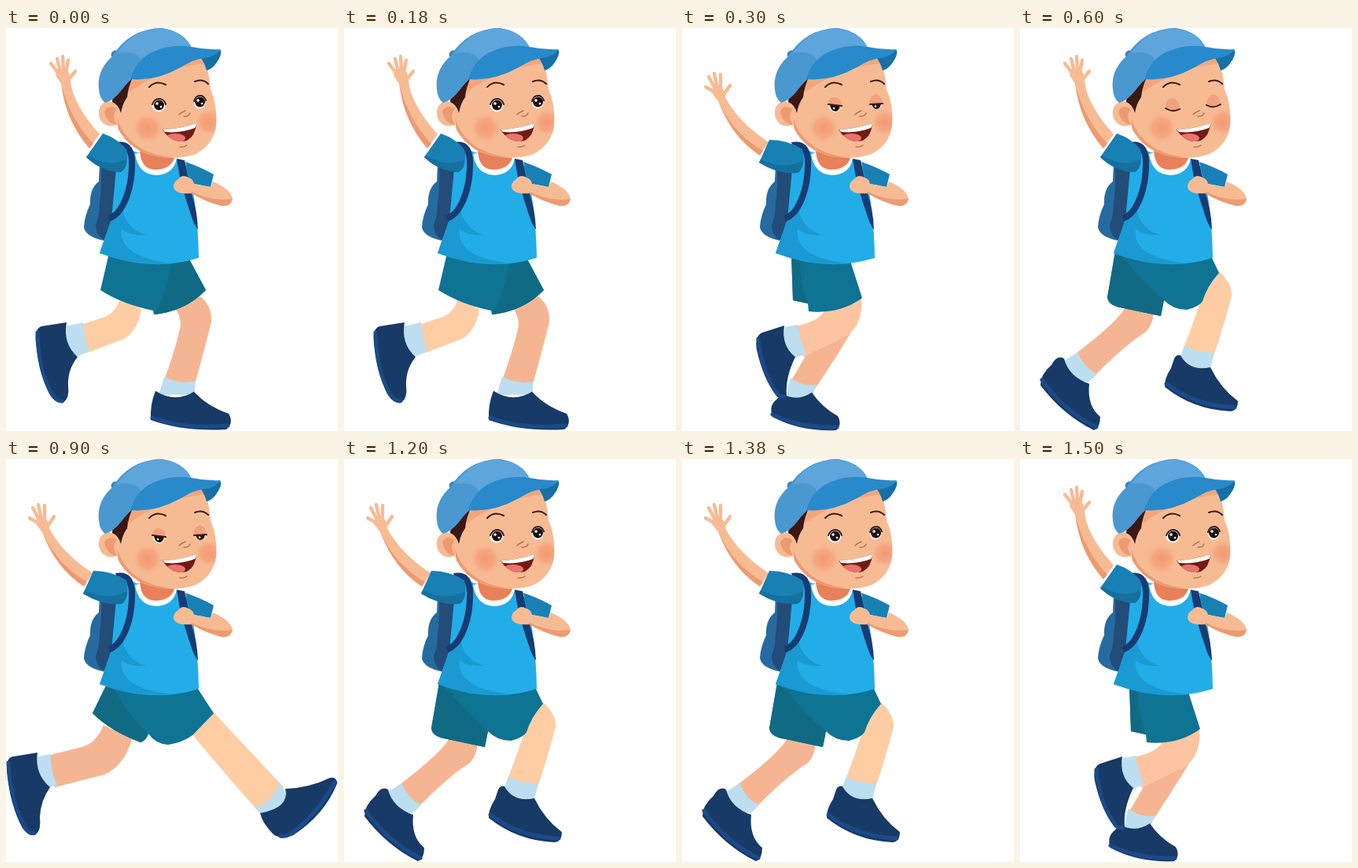
These frames come from a looping animation (422x512 px, 1.8 s). An HTML page:

```html
<!DOCTYPE html>
<html lang="en">
<head>
<meta charset="utf-8">
<title>Walking schoolboy</title>
<style>
html, body { margin: 0; width: 100%; height: 100%; overflow: hidden; background: #fff; }
svg { display: block; width: 100vw; height: 100vh; }

/* Poses switch hard, six beats of 300 ms */
.pose { opacity: 0; animation: 1.8s step-end infinite; }
.arm-up { animation-name: arm-up; }
.arm-out { animation-name: arm-out; }
.eyes-open { animation-name: eyes-open; }
.eyes-half { animation-name: eyes-half; }
.eyes-shut { animation-name: eyes-shut; }
.kick { animation-name: kick; }
.pass { animation-name: pass; }
.step { animation-name: step; }
.leap { animation-name: leap; }
@keyframes arm-up { 0%, 33.33%, 83.33% { opacity: 1 } 16.66%, 50%, 100% { opacity: 0 } }
@keyframes arm-out { 0%, 33.33%, 83.33%, 100% { opacity: 0 } 16.66%, 50% { opacity: 1 } }
@keyframes eyes-open { 0%, 66.66%, 100% { opacity: 1 } 16.66% { opacity: 0 } }
@keyframes eyes-half { 0%, 33.33%, 66.66%, 100% { opacity: 0 } 16.66%, 50% { opacity: 1 } }
@keyframes eyes-shut { 0%, 50%, 100% { opacity: 0 } 33.33% { opacity: 1 } }
@keyframes kick { 0% { opacity: 1 } 16.66%, 100% { opacity: 0 } }
@keyframes pass { 0%, 33.33%, 100% { opacity: 0 } 16.66%, 83.33% { opacity: 1 } }
@keyframes step { 0%, 50%, 83.33%, 100% { opacity: 0 } 33.33%, 66.66% { opacity: 1 } }
@keyframes leap { 0%, 66.66%, 100% { opacity: 0 } 50% { opacity: 1 } }

.skin { fill: #f7bb94; }
.thigh { fill: #fdc4a2; }
.near { fill: #fecda4; }
.far { fill: #f6b592; }
.shade { fill: #ee9a70; }
.neck { fill: #e8805a; }
.sock { fill: #bcdef0; }
.shoe { fill: #183a66; }
.sole { fill: none; stroke: #1b4a8a; stroke-width: 5; stroke-linecap: round; }
.shorts { fill: #0f7394; }
.deep { fill: #116a84; }
.sleeve { fill: #1980b4; }
.fold { fill: #15709f; }
.strap { fill: none; stroke: #173c73; stroke-width: 8; }
.fingers { fill: none; stroke: #f7bb94; stroke-width: 4.4; stroke-linecap: round; }
.line { fill: none; stroke: #3b1714; stroke-width: 2; stroke-linecap: round; }
.crease { fill: none; stroke: #c4704c; stroke-width: 1.5; stroke-linecap: round; }
.lid { fill: #f0a27c; }
.ink { fill: #1d100f; }
.white { fill: #fff; }
</style>
</head>
<body>
<svg viewBox="0 0 422 512" xmlns="http://www.w3.org/2000/svg">
  <defs>
    <radialGradient id="blush">
      <stop offset="0" stop-color="#f28f6c" stop-opacity=".8"/>
      <stop offset=".55" stop-color="#f3976f" stop-opacity=".55"/>
      <stop offset="1" stop-color="#f7bb94" stop-opacity="0"/>
    </radialGradient>
    <clipPath id="face"><path id="facePath" d="M151 92L160 60Q205 34 249 37Q258 50 260 78Q269 97 267 124Q264 148 241 160Q219 168 190 163Q158 156 143 129Q138 108 151 92Z"/></clipPath>
    <clipPath id="mouth"><path id="mouthPath" d="M199 129Q222 128 242 121Q241 137 230 143Q211 148 199 129Z"/></clipPath>
  </defs>

  <!-- backpack -->
  <path fill="#266ba0" d="M119 172L118 195Q106 204 107 224Q100 238 99 253Q101 265 124 270L140 240L142 172Z"/>
  <path fill="#234c79" d="M121 172L142 172L140 243L125 270Q114 263 114 250Q119 238 119 222Q122 200 121 172Z"/>

  <!-- legs -->
  <g class="pose kick">
    <path class="near" d="M145 344Q140 361 126 367L95 377L102 413L150 395Q168 384 172 357Z"/>
    <path class="sock" d="M75 379L98 374Q100 395 106 411L86 419Q72 399 75 379Z"/>
    <path class="shoe" d="M77 374L45 379Q36 382 38 400Q42 438 55 464Q64 478 73 476Q81 470 79 455Q78 434 91 418Q72 401 77 374Z"/>
    <path class="sole" d="M40 387Q41 434 58 465Q64 474 71 474"/>
    <path class="far" d="M215 356L247 341Q262 353 261 373Q252 410 239 456L200 450Q215 410 222 378Q222 366 215 356Z"/>
    <path class="sock" d="M201 443Q220 453 241 449L239 466L194 466Z"/>
    <path class="shoe" d="M190 461Q215 477 239 462Q255 480 283 490Q290 502 280 510Q225 513 184 498Q183 478 190 461Z"/>
    <path class="sole" d="M186 495Q224 510 282 505"/>
    <path class="shorts" d="M131 286L120 333Q148 351 187 359L188 364Q228 360 254 333L231 290Z"/>
    <path class="deep" d="M210 296L231 290L254 333Q228 360 188 364Q206 334 210 296Z"/>
  </g>
  <g class="pose pass">
    <path class="far" d="M180 366L214 388Q200 412 168 460L136 452Q154 424 164 402L180 380Z"/>
    <path class="sock" d="M138 444Q152 456 171 453L165 469L133 469Q134 455 138 444Z"/>
    <path class="shoe" d="M128 465Q147 475 165 463Q178 482 198 493Q204 504 196 511Q150 513 115 494Q110 480 120 472Z"/>
    <path class="sole" d="M115 491Q148 508 197 507"/>
    <path class="thigh" d="M181 358Q178 371 145 379L154 418L210 391Q231 375 228 342Z"/>
    <path class="sock" d="M131 380L147 377Q150 398 158 414L138 421Q127 398 131 380Z"/>
    <path class="shoe" d="M130 378L102 387Q92 391 95 409Q103 445 120 467Q128 474 133 468Q131 444 144 418Q126 404 130 378Z"/>
    <path class="sole" d="M97 395Q101 438 122 466Q126 470 130 468"/>
    <path class="shorts" d="M139 288L141 346L160 350L161 360Q200 364 229 343L212 290Z"/>
    <path class="deep" d="M139 288L141 346L160 350Q151 326 150 298Z"/>
  </g>
  <g class="pose step">
    <path class="far" d="M134 354Q127 371 69 415L92 445Q130 405 160 386Q169 377 170 360Z"/>
    <path class="sock" d="M73 412Q82 432 98 440L87 450Q62 447 56 423Z"/>
    <path class="shoe" d="M56 420Q62 443 88 452Q85 480 102 494Q102 508 94 511Q55 492 26 454Q26 440 40 428Q47 415 56 420Z"/>
    <path class="sole" d="M28 447Q56 487 97 507"/>
    <path class="near" d="M253 309Q270 325 269 340Q260 376 245 420L206 412Q222 370 230 345Z"/>
    <path class="sock" d="M209 403Q225 414 247 411L242 433Q220 440 203 420Z"/>
    <path class="shoe" d="M204 416Q216 437 242 431Q255 458 277 474Q277 486 268 487Q220 485 184 456Q183 446 192 432L196 420Q199 414 204 416Z"/>
    <path class="sole" d="M186 452Q222 480 273 482"/>
    <path class="shorts" d="M121 284L111 342Q112 352 127 355L179 366L183 346Q195 358 212 358Q228 354 232 347Q238 328 253 311L243 290Z"/>
    <path class="deep" d="M121 284L111 342Q112 352 127 355L179 366L183 346Q157 324 135 296Z"/>
  </g>
  <g class="pose leap">
    <path class="far" d="M124 338Q115 361 96 366L52 377L62 417L125 401Q150 390 160 356Z"/>
    <path class="sock" d="M40 378L57 375Q56 395 65 414L50 419Q36 398 40 378Z"/>
    <path class="shoe" d="M40 373L9 378Q0 379 1 396Q5 440 21 469Q30 481 38 477Q45 471 43 455Q44 434 56 417Q36 400 40 373Z"/>
    <path class="sole" d="M3 386Q6 438 25 469Q30 477 36 475"/>
    <path class="near" d="M262 320L353 417L322 449Q278 400 235 348Z"/>
    <path class="sock" d="M347 412Q357 420 356 436Q345 448 325 451L316 443Q340 435 347 412Z"/>
    <path class="shoe" d="M355 419Q361 443 323 450Q326 463 340 477Q350 484 365 478Q405 452 421 412Q420 403 412 405Q385 418 355 419Z"/>
    <path class="sole" d="M418 410Q396 452 362 476Q355 480 349 479"/>
    <path class="shorts" d="M128 286L110 323Q133 346 171 360Q178 358 181 349Q190 362 206 363Q225 360 237 351L264 323L242 289Z"/>
    <path class="deep" d="M128 286L110 323Q133 346 171 360Q178 358 181 349Q157 328 140 296Z"/>
  </g>

  <!-- shirt and straps -->
  <path fill="#22ade8" d="M143 148L166 158L217 166L232 178Q244 230 245 292Q185 311 119 286L134 243Z"/>
  <path fill="#1b99d2" d="M148 232Q155 257 179 263Q155 264 147 255Q144 275 165 287Q185 297 215 299Q165 304 119 286L134 243Z"/>
  <path class="strap" d="M140 149Q158 145 160 167Q161 200 149 224Q142 238 131 242"/>
  <path fill="#173c73" d="M217 166L227 168Q231 185 235 208Q243 230 244 256Q239 250 236 240Q227 214 221 190Z"/>

  <!-- neck and collar -->
  <path class="white" d="M164 160Q168 186 191 187Q213 186 217 166L208 150Z"/>
  <path class="neck" d="M170 152Q170 180 190 180Q213 179 215 160Z"/>

  <!-- bent arm -->
  <path class="sleeve" d="M228 170Q248 177 264 186L260 202L234 197Z"/>
  <path class="skin" d="M213 202Q213 195 219 192Q224 185 232 190Q238 192 239 198L260 202L263 195Q286 205 288 217Q285 227 275 226Q256 221 236 210Q215 212 213 202Z"/>
  <path class="shade" d="M236 208Q262 221 288 217Q286 227 275 226Q256 222 235 210Z"/>

  <!-- waving arm -->
  <g class="pose arm-up">
    <path class="skin" d="M63 60Q65 51 74 52Q82 55 82 66Q84 96 119 135L106 153Q76 118 70 71Z"/>
    <path class="shade" d="M71 74Q82 116 111 147L106 153Q76 118 71 74Z"/>
    <path class="fingers" d="M67 58L57 45M69 56L65 39M73 55L72 36M76 57L79 41M79 66L88 55"/>
    <path class="sleeve" d="M123 134L102 164Q120 182 146 183Q157 176 153 154Q141 140 123 134Z"/>
    <path class="fold" d="M104 162Q132 178 153 167Q154 178 146 183Q120 182 102 164Z"/>
  </g>
  <g class="pose arm-out">
    <path class="skin" d="M37 81Q39 73 47 73Q55 77 55 88Q71 119 110 145L99 162Q64 139 46 93Z"/>
    <path class="shade" d="M47 95Q67 136 103 156L99 162Q64 139 47 95Z"/>
    <path class="fingers" d="M41 81L30 75M42 77L34 62M45 76L41 58M49 76L49 59M53 85L61 73"/>
    <path class="sleeve" d="M111 142L98 171Q122 186 147 184Q158 174 153 154Q134 142 111 142Z"/>
    <path class="fold" d="M100 167Q130 181 154 168Q154 180 147 184Q122 186 98 171Z"/>
  </g>

  <!-- head -->
  <ellipse class="skin" cx="132" cy="109" rx="14" ry="16" transform="rotate(-18 132 109)"/>
  <path class="shade" d="M141 103Q130 96 125 106Q127 120 142 124Q133 112 141 103Z"/>
  <use href="#facePath" class="skin"/>
  <g clip-path="url(#face)">
    <path class="shade" d="M141 114Q154 156 206 164L190 170L140 150Z"/>
    <path class="shade" d="M156 82Q200 50 252 45L249 34L155 50Z" opacity=".6"/>
    <circle cx="180" cy="127" r="21" fill="url(#blush)"/>
    <circle cx="258" cy="120" r="19" fill="url(#blush)"/>
  </g>
  <path fill="#3c1714" d="M136 80L163 58Q155 75 154 88Q148 96 146 108Q143 97 135 94Z"/>

  <path class="line" d="M182 75Q191 66 203 72M240 68Q250 64 257 71"/>
  <path class="crease" d="M220 110Q223 107 228 105M226 112Q232 113 234 108"/>
  <use href="#mouthPath" fill="#741a16"/>
  <g clip-path="url(#mouth)">
    <path class="white" d="M198 127L245 119L240 127Q222 134 202 132Z"/>
    <ellipse cx="215" cy="140" rx="13" ry="6" fill="#e8736f"/>
  </g>
  <path class="crease" d="M221 151Q226 152 230 149"/>

  <g class="pose eyes-open">
    <circle class="white" cx="194" cy="98" r="8.500"/>
    <ellipse class="white" cx="246" cy="94" rx="7.500" ry="8.500"/>
    <circle class="ink" cx="194.500" cy="98" r="6.500"/>
    <circle class="ink" cx="246.500" cy="94" r="6.500"/>
    <path class="line" d="M186 97Q189 89 196 90Q201 91 203 97M239 93Q241 85 248 86Q252 87 254 92"/>
    <g class="white">
      <circle cx="192" cy="96" r="1.800"/><circle cx="197" cy="100" r="1.300"/>
      <circle cx="244" cy="92" r="1.800"/><circle cx="249" cy="96" r="1.300"/>
    </g>
  </g>
  <g class="pose eyes-half">
    <path class="lid" d="M185 97Q187 87 195 88Q202 89 203 98ZM238 96Q239 85 247 84Q254 86 255 96Z"/>
    <path class="white" d="M186 98H203Q201 107 194 107Q188 106 186 98ZM239 96H255Q253 103 247 103Q241 102 239 96Z"/>
    <path class="ink" d="M188 98H201Q200 106 195 106Q189 105 188 98ZM241 96H253Q252 103 247 103Q242 102 241 96Z"/>
    <path class="line" d="M186 97L203 99M239 97L255 96"/>
    <circle class="white" cx="193" cy="102" r="1.300"/>
    <circle class="white" cx="246" cy="99.500" r="1.300"/>
  </g>
  <g class="pose eyes-shut">
    <path class="lid" d="M185 102Q186 89 194 89Q202 90 203 102Q194 109 185 102ZM237 98Q238 85 246 84Q254 87 255 97Q246 104 237 98Z"/>
    <path class="line" d="M185 102Q194 108 203 103M237 98Q246 103 255 97"/>
  </g>

  <!-- cap -->
  <ellipse cx="138" cy="33" rx="4" ry="5" fill="#3583bf" transform="rotate(40 138 33)"/>
  <path fill="#4a98d0" d="M118 78Q115 54 135 36Q157 1 197 0Q226 4 236 25L196 40Q160 60 147 79Q137 92 126 95Q119 90 118 78Z"/>
  <path fill="#5da5da" d="M141 32Q162 1 197 0Q226 4 236 25Q200 19 172 42Q167 28 141 32Z"/>
  <path fill="#1670a6" d="M246 36Q262 34 273 28Q275 34 267 45Q262 52 255 54Q252 43 246 36Z"/>
  <path fill="#288aca" d="M158 65Q166 38 190 29Q211 20 236 24Q255 28 273 27Q267 36 253 38Q240 39 222 50Q190 68 158 65Z"/>
</svg>
</body>
</html>
```
